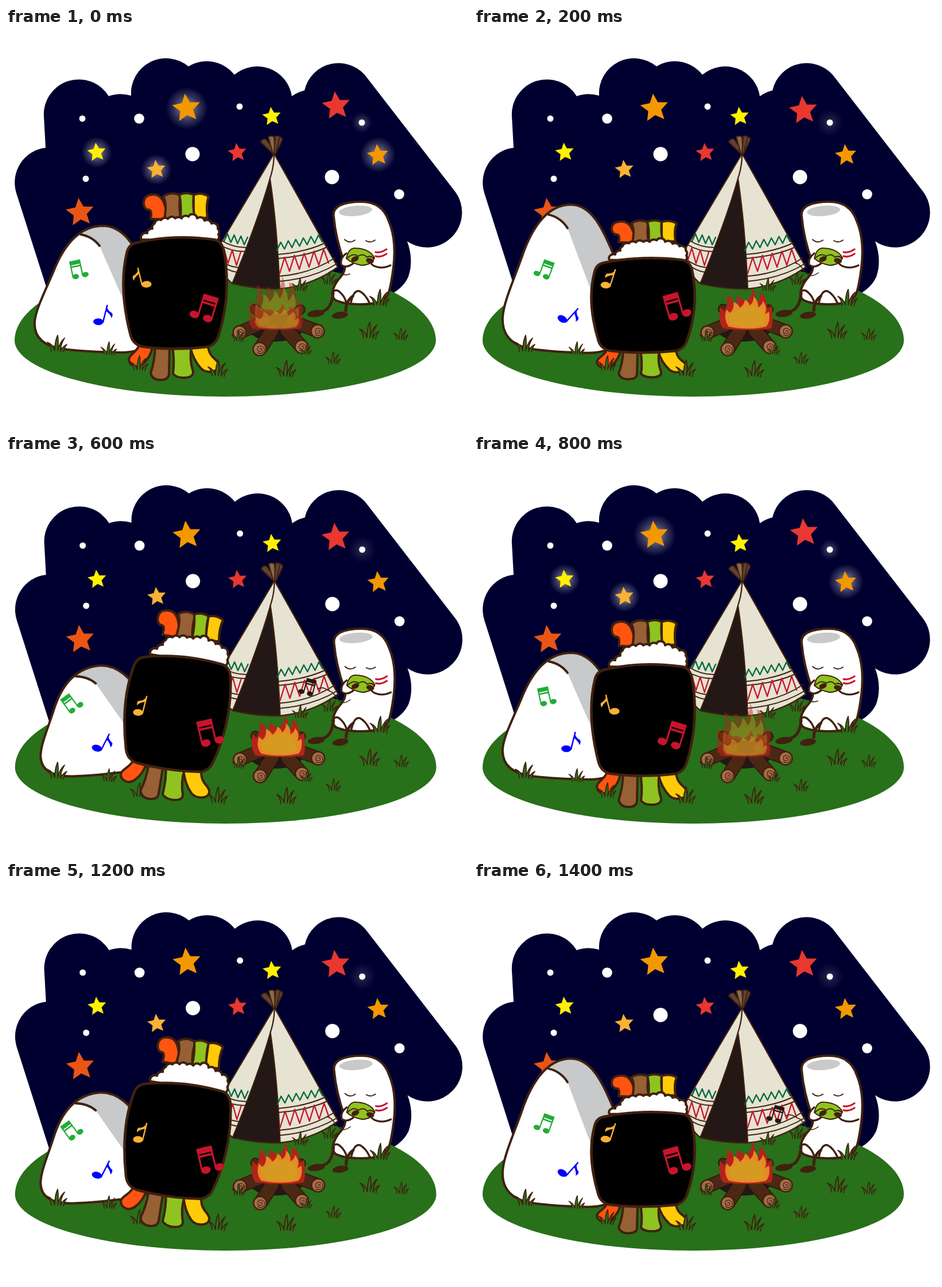
An HTML page that plays this animation: 805 px wide and 696 px high, repeating every 1600 ms.

```html
<!DOCTYPE html>
<html lang="en">
<head>
<meta charset="utf-8">
<title>Campfire night</title>
<style>
html, body { margin: 0; width: 100%; height: 100%; overflow: hidden; background: #fff; }
svg { display: block; width: 805px; height: 696px; }
.ink { stroke: #40210f; stroke-linejoin: round; stroke-linecap: round; }
.line { fill: none; }
#ball *, #roll * { vector-effect: non-scaling-stroke; }
</style>
</head>
<body>
<svg id="stage" viewBox="0 0 805 696" xmlns="http://www.w3.org/2000/svg"></svg>
<script>
const INK = '#40210f', NIGHT = '#000030', GRASS = '#28701a';
const path = (d, fill, width = 0, extra = '') =>
  `<path d="${d}" fill="${fill}" ${width ? `class="ink" stroke-width="${width}"` : ''} ${extra}/>`;
const line = (d, width, color = INK) =>
  `<path d="${d}" fill="none" stroke="${color}" stroke-width="${width}" stroke-linecap="round" stroke-linejoin="round"/>`;
const dot = (x, y, r, fill) => `<circle cx="${x}" cy="${y}" r="${r}" fill="${fill}"/>`;
const oval = (x, y, rx, ry, fill, turn = 0) =>
  `<ellipse cx="${x}" cy="${y}" rx="${rx}" ry="${ry}" fill="${fill}" transform="rotate(${turn} ${x} ${y})"/>`;
const group = (id, body) => `<g id="${id}">${body}</g>`;

// Sky
function star(x, y, r, color) {
  const pts = [];
  for (let i = 0; i < 10; i++) {
    const a = (i * 36 - 96) * Math.PI / 180, d = i % 2 ? r * 0.47 : r;
    pts.push((x + d * Math.cos(a)).toFixed(1) + ',' + (y + d * Math.sin(a)).toFixed(1));
  }
  return `<polygon points="${pts.join(' ')}" fill="${color}"/>`;
}
const glow = (x, y, r, opacity = 1) =>
  `<circle cx="${x}" cy="${y}" r="${r}" fill="url(#halo)" opacity="${opacity}"/>`;

const sky = path(`M76 470 L18 288 A60 61 0 0 1 69 209 L66 155 A61 61 0 0 1 179 119
  Q198 112 218 118 A61 61 0 0 1 318 67 A61 61 0 0 1 398 81.600 A61 61 0 0 1 498 119
  Q507 112 520 109 A61 61 0 0 1 630 88 L783 286 A61 61 0 0 1 699 372
  Q711 405 701 434 Q693 452 672 464 Z`, NIGHT);
const stars = [
  [314.5, 140, 25.5, '#f39800'], [463, 154.5, 17, '#fff100'], [648, 222, 19.5, '#f39800'],
  [158, 217, 17, '#fff100'], [262, 247, 17, '#f9b233'], [403, 217.5, 17, '#e8382f'],
  [129, 322, 25.5, '#ea5514']
].map(s => star(...s)).join('');
const dots = [
  [133, 158, 5.5], [232, 158, 8.8], [407, 137, 5.5], [568, 260, 12.5],
  [620, 165, 5.5], [685, 290, 8.8], [139, 263, 5.5]
].map(d => dot(...d, '#fff')).join('');
const halos = glow(315, 140, 37) + glow(158, 217, 27) + glow(262, 247, 27) +
  glow(648, 221, 31) + glow(620, 165, 18, 0.5);

// Tent
function zigzag(x1, y1, x2, y2, drop, teeth, color) {
  let d = '';
  for (let i = 0; i <= teeth * 2; i++) {
    const k = i / (teeth * 2);
    d += `${i ? 'L' : 'M'}${(x1 + (x2 - x1) * k).toFixed(1)} ${(y1 + (y2 - y1) * k + (i % 2 ? 0 : drop)).toFixed(1)}`;
  }
  return line(d, 2.3, color);
}
const pole = (d, fill) => path(d, fill, 2);
const tent =
  pole('M465 219L444 199Q446 193 453 194L469 216Z', '#604132') +
  pole('M477 190Q482 191 481 196L470 219L465 216Z', '#604132') +
  pole('M457 190Q462 187 467 190L469 219L465 219Z', '#8a6a48') +
  pole('M469 189Q474 187 477 190L470 219L467 219Z', '#604132') +
  path('M467 219L365 391Q373 430 395 446Q435 456 477 455Q534 449 578 417Z', '#e6e3d3', 2.3) +
  path('M460 262C445 315 417 390 394 446Q435 455 477 455Q473 350 460 262Z', '#231815', 2) +
  line('M467 220Q467 242 460 262', 2.3) +
  zigzag(380, 358, 421, 365, 14, 3.5, '#00693e') +
  zigzag(472, 375, 551, 360, 13, 6, '#00693e') +
  line('M376 371Q395 383 419 383M372 378Q392 390 416 390M368 402Q385 416 405 418M371 411Q387 424 402 426', 2) +
  line('M474 395Q522 391 556 375M474 402Q525 398 560 382M476 433Q530 429 573 401M476 442Q535 437 577 411', 2) +
  zigzag(372, 382, 409, 391, 25, 2.5, '#c7142c') +
  zigzag(477, 402, 562, 384, 26, 5, '#c7142c');

// Campfire
const log = (x1, y1, x2, y2, w) =>
  line(`M${x1} ${y1}L${x2} ${y2}`, w + 3, '#2b150b') + line(`M${x1} ${y1}L${x2} ${y2}`, w, '#4c2814');
const cut = (x, y) => `<circle cx="${x}" cy="${y}" r="11.5" fill="#a56d48" class="ink" stroke-width="2.5"/>` +
  line(`M${x} ${y}q4 -3 4 2q-3 5 -8 0q-1 -8 7 -7q8 3 4 10q-6 5 -11 1`, 1.2);
const logs =
  log(434, 490, 460, 510, 15) + log(513, 491, 485, 510, 15) +
  oval(470, 523, 48, 24, '#231815') +
  log(409, 530, 450, 513, 21) + log(541, 528, 498, 512, 21) +
  log(444, 558, 463, 528, 22) + log(514, 555, 490, 528, 22) +
  cut(407, 531) + cut(543, 529) + cut(442, 560) + cut(515, 556);
const blaze =
  path(`M434 524Q424 510 429 487L436 494Q443 482 441 465Q452 472 455 484Q460 478 457 468
    Q468 470 472 477Q485 470 485 453Q492 465 491 481Q500 475 497 462Q510 465 511 490
    L519 485Q522 512 518 524Q477 530 434 524Z`, '#b3231b') +
  path(`M444 521Q434 508 440 491L446 497Q454 490 452 478Q461 481 463 488Q471 483 472 474
    Q479 477 480 484Q488 479 487 468Q496 476 495 487Q503 483 503 476Q512 487 507 499L514 495
    Q517 512 509 521Q478 528 444 521Z`, '#e58a24') +
  path(`M449 517Q441 506 446 497Q455 500 459 489Q466 494 471 483Q479 492 485 482
    Q492 493 500 489Q509 507 505 518Q477 524 449 517Z`, '#d69a22');
const smoulder = `<g opacity=".45" transform="translate(-4 525) scale(1 1.29) translate(0 -525)">${blaze}</g>` +
  `<g opacity=".5" transform="translate(-4 525) scale(1 .62) translate(0 -525)">${blaze}</g>`;

// Marshmallow with a leaf mouth organ
const mallow =
  path(`M571 329C568 310 590 303 619 303C646 303 660 316 667 337C679 365 678 402 673 432
    C669 458 666 470 655 477C636 484 590 484 573 474C565 466 570 451 579 439
    C589 428 593 420 589 408C579 380 573 352 571 329Z`, '#fff', 4) +
  oval(609, 319, 29, 9, '#c9c9ca', -5) +
  line('M590 369Q599 377 608 370M627 371Q635 376 643 370', 2) +
  line('M644 391Q652 393 663 386M644 398Q652 401 663 394', 3.2, '#c7142c') +
  path('M593 393Q582 401 584 413Q594 421 608 408', '#fff', 3.2) +
  path('M670 414Q655 421 641 415Q632 409 632 401', '#fff', 3.2) +
  path('M593 402Q597 383 609 384Q634 385 642 401Q637 413 620 414Q603 411 593 402Z', '#8fc31f', 2) +
  line('M595 401Q605 392 614 398Q622 392 629 400Q635 396 641 402', 2) +
  oval(608, 403, 7, 4.5, INK, -25) + oval(634, 406, 7, 4.5, INK, 15) +
  path('M568 463Q574 453 582 461Q590 468 593 479', '#fff', 3.5) +
  path('M601 479Q606 456 616 459Q626 464 633 479', '#fff', 3.5) +
  line('M570 463Q567 490 552 494', 5) + line('M604 468Q592 477 592 493', 5) +
  oval(540, 498, 15, 6, INK, -8) + oval(582, 501, 14, 6, INK, -8);

// Rice ball, drawn at its resting height
const SIDE = 'M50 512C52 490 68 460 83 424C98 386 123 346 168 345C208 345 226 386 246 425L255 548Q235 566 200 566Q140 565 100 560C66 555 48 540 50 512Z';
const ball = path(SIDE, '#fff') +
  path('M131 359Q150 345 168 345C208 345 226 386 246 425L250 560L216 500Q190 442 163 380Q151 364 131 359Z', '#c8c9ca') +
  path(SIDE, 'none', 4) + line('M130 360Q151 364 163 380', 4);

// Wrapped roll
const bumps = [[236, 369], [246, 358], [255, 350], [259, 341], [270, 335], [282, 333], [295, 332],
  [306, 332], [318, 329], [333, 332], [346, 336], [358, 341], [369, 350], [370, 360], [364, 372]];
const rice = bumps.map((p, i) => (i ? 'A8 8 0 0 1 ' : 'M') + p.join(' ')).join('') + 'Z';
const roll =
  path('M252 333Q255 318 249 317C238 318 236 296 248 292C272 284 278 306 282 334Z', '#ff5510', 4) +
  path('M276 333Q281 305 274 294Q288 284 304 292Q300 312 305 334Z', '#976035', 4) +
  path('M327 332L351 331Q348 308 353 294Q341 286 327 291Z', '#ffcb08', 4) +
  path('M304 333Q306 308 302 291Q315 285 327 291Q325 310 329 333Z', '#8fc31f', 4) +
  path('M232 552C230 564 215 569 214 578C215 590 230 595 240 585Q253 572 255 556Z', '#ff5510', 4) +
  path('M260 555Q259 582 252 602Q255 614 269 614Q283 614 284 604L285 555Z', '#976035', 4) +
  path('M290 555Q294 580 291 603Q298 611 312 610Q327 609 326 599Q319 578 323 555Z', '#8fc31f', 4) +
  path('M321 556Q326 579 340 594C350 604 372 600 371 588C369 576 355 578 352 555Z', '#ffcb08', 4) +
  path(rice, '#fff', 4) +
  path('M226 375Q290 359 362 369Q376 371 380 390Q393 465 370 538Q366 551 352 556Q294 563 239 556Q222 553 217 536Q196 455 210 394Q213 378 226 375Z', '#000', 4.5);

// Music notes: heads left of the stems, flag to either side
const single = flag => `<ellipse cx="-4" cy="14" rx="9" ry="6" transform="rotate(-12 -4 14)"/>
  <path d="M3 14L3 -19L5.500 -19L5.500 14Z"/>
  <path transform="translate(4 0) scale(${flag} 1)" d="M-1 -19Q2 -9 12 -7Q15 -4 13 2Q10 -4 0 -8Z"/>`;
const pair = `<ellipse cx="-12" cy="14" rx="6.500" ry="5"/><ellipse cx="7" cy="14" rx="6.500" ry="5"/>
  <path d="M-8 14V-17H13.500V14H11V-4H-5.500V14ZM-5.500 -9V-7H11V-9Z" fill-rule="evenodd"/>`;
const noteBox = (id, color) => `<g id="${id}" fill="${color}"></g>`;

// Grass
const tuft = (x, y, s = 1) => `<g transform="translate(${x} ${y}) scale(${s})">` +
  path('M-10 12Q-10 2 -17 -4Q-7 0 -4 11Q-4 -6 1 -16Q3 -4 1 11Q4 -3 13 -11Q6 0 6 12Q10 3 17 0Q12 6 11 13', GRASS, 1.8) + '</g>';
const tufts = list => list.map(t => tuft(...t)).join('');
const farGrass = tufts([[512, 449, .8], [563, 438, .8]]);
const nearGrass = tufts([[651, 472], [633, 529], [688, 535, .75], [570, 577, .75], [488, 596], [405, 538, .7], [523, 562, .6]]);
const ballGrass = tufts([[89, 552], [179, 560, .8]]);

document.getElementById('stage').innerHTML =
  `<defs><radialGradient id="halo"><stop offset=".25" stop-color="#fff" stop-opacity=".42"/>
   <stop offset=".6" stop-color="#fff" stop-opacity=".2"/><stop offset="1" stop-color="#fff" stop-opacity="0"/></radialGradient></defs>` +
  group('scene', sky + group('halos', halos) + group('dim', glow(620, 165, 24, .28)) + stars + dots +
    group('moon', dot(325, 220, 12.5, '#fff')) + group('red', star(575.5, 136, 25.5, '#e8382f')) +
    path('M15 545A367 98 0 0 0 749 545A367 140 0 0 0 15 545Z', GRASS) +
    tent + farGrass + logs + group('blaze', blaze) + group('smoulder', smoulder) + mallow + nearGrass) +
  noteBox('dark', '#231815') + '<path id="tune" class="ink line" stroke-width="1.600"/>' +
  group('ball', ball) + noteBox('green', '#22ac38') + noteBox('blue', '#0000ff') + ballGrass +
  tuft(232, 586, .9) + group('roll', roll) + noteBox('gold', '#f9b233') + noteBox('crimson', '#c7142c') +
  group('footGrass', tuft(232, 586, .9)) + tuft(369, 595);

const grow = (base, k) => `translate(0 ${base}) scale(1 ${k}) translate(0 ${-base})`;
// Notes: x, y, turn, mirror, flag side
const rest = {
  rest: true, ball: grow(562, 1), roll: grow(605, 1),
  green: [125, 420, -12, -1], blue: [168, 500, 14, 1, 1],
  gold: [238, 435, -14, -1, 1], crimson: [348, 487, 17, 1]
};
const tall = {
  ball: grow(562, 1.17), roll: grow(605, .85),
  green: [124, 420, 20, 1], blue: [166, 500, 42, 1, 1],
  gold: [237, 437, 18, 1, -1], crimson: [351, 484, -16, -1]
};
const lean = {
  shift: .7, ball: `translate(16 3) rotate(-8 80 562) ${grow(562, .86)}`,
  roll: `translate(2 -12) rotate(8 296 461) ${grow(461, 1.02)}`,
  green: [113, 432, -36, -1], blue: [168, 501, 27, 1, 1],
  gold: [237, 437, 14, 1, -1], crimson: [353, 483, -13, -1]
};
const squat = {
  ball: grow(562, .862), roll: grow(605, 1.027), flameX: -4,
  green: [127, 429, 10, 1], blue: [169, 501, -24, -1, -1],
  gold: [245, 418, 11, 1, -1], crimson: [352, 484, -8, 1]
};

const TUNES = [
  'M582 427Q590 433 599 429',
  'M560 410C573 412 573 430 589 432Q595 431 600 427',
  'M543 408C556 402 559 412 567 413C575 417 579 433 589 432Q595 431 600 427'
];
// Pose, tune length, drop of the large dot
const STEPS = [
  [rest, 0], [tall, 1], [squat, 1], [lean, 2],
  [rest, 0], [squat, 0], [lean, 1], [tall, 2, 12]
];

const el = id => document.getElementById(id);
const move = (id, value) => el(id).setAttribute('transform', value);
const show = (id, on) => el(id).setAttribute('display', on ? 'inline' : 'none');
function place(id, [x, y, turn, mirror, flag], size) {
  move(id, `translate(${x} ${y}) rotate(${turn}) scale(${mirror * size} ${size})`);
  el(id).innerHTML = flag ? single(flag) : pair;
}

function draw(step) {
  const [pose, tune, drop = 0] = STEPS[step];
  move('scene', `translate(${pose.shift || 0} 0)`);
  move('ball', pose.ball);
  move('roll', pose.roll);
  move('red', pose.rest ? '' : 'translate(-1.5 8)');
  move('moon', `translate(0 ${drop})`);
  move('blaze', `translate(${pose.flameX || 0} 0)`);
  show('halos', pose.rest);
  show('dim', !pose.rest);
  show('smoulder', pose.rest);
  show('blaze', !pose.rest);
  show('footGrass', pose !== lean);
  show('dark', tune === 2);
  place('green', pose.green, .9);
  place('blue', pose.blue, .98);
  place('gold', pose.gold, .96);
  place('crimson', pose.crimson, 1.28);
  place('dark', [527, 404, 15, 1], .82);
  el('tune').setAttribute('d', TUNES[tune]);
}

const start = performance.now();
let shown = -1;
function tick() {
  const step = Math.floor((performance.now() - start) / 200) % STEPS.length;
  if (step !== shown) draw(shown = step);
  requestAnimationFrame(tick);
}
tick();
</script>
</body>
</html>
```
